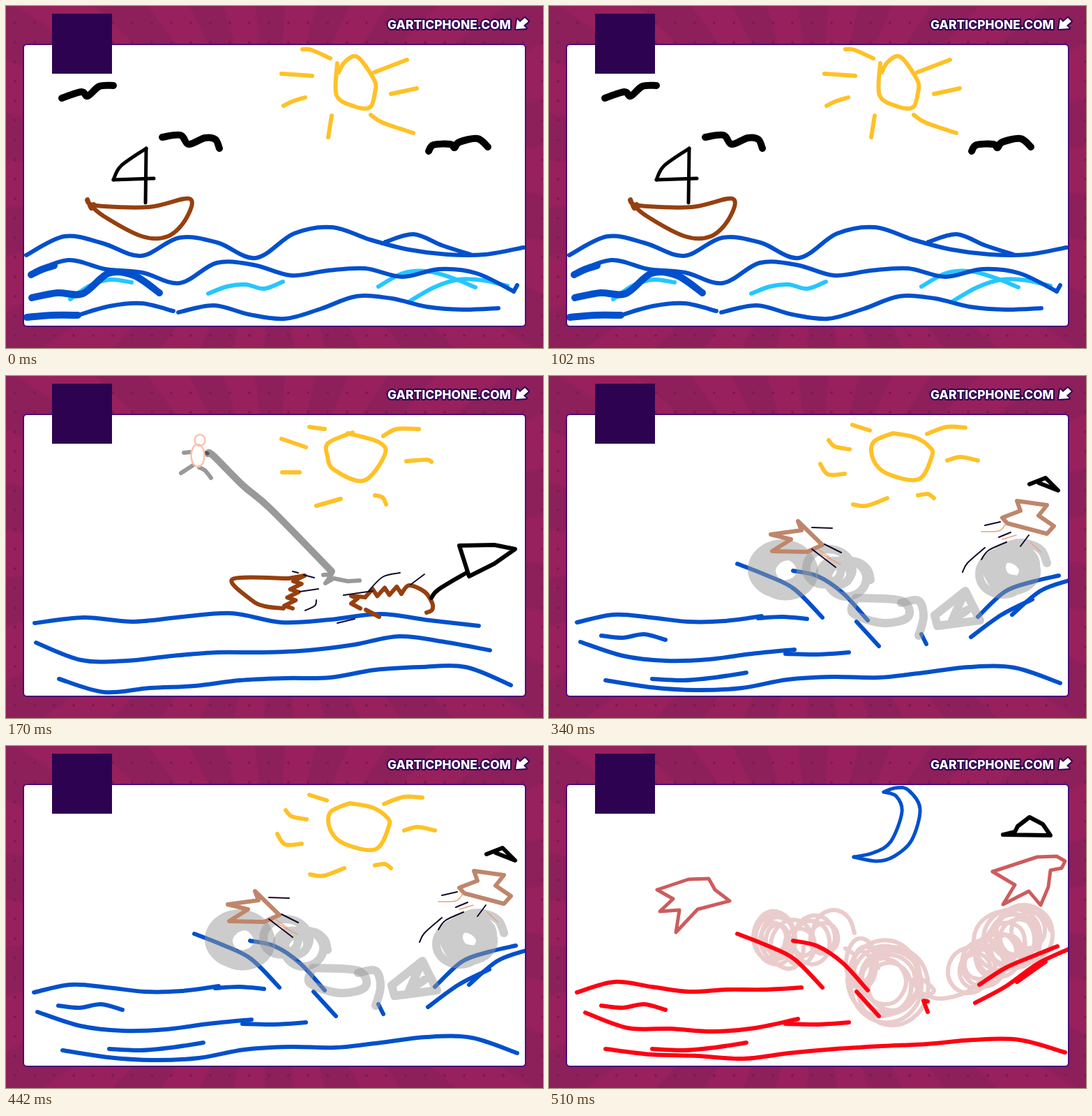
Write an HTML page that moves like this. It is 770 px wide and 490 px high and loops after 0.68 s.

```html
<!DOCTYPE html>
<html lang="en">
<head>
<meta charset="utf-8">
<title>Boat trip</title>
<style>
html, body { margin: 0; width: 100%; height: 100%; overflow: hidden; }
body { background: radial-gradient(circle, #7d1a55 1.8px, transparent 2.4px) -1px 10px / 28px 28px,
  repeating-conic-gradient(from 4deg at 385px 245px, #98215d 0 9deg, #8d1f5b 10deg 19deg, #98215d 20deg); }
svg { display: block; width: 770px; height: 490px; }
text { font: 800 17.4px Inter, "Open Sans", sans-serif; }
.tag { fill: #fff; stroke: #2d0351; stroke-width: 4; stroke-linejoin: round; paint-order: stroke; }
#scenes { fill: none; stroke-linecap: round; stroke-linejoin: round; }
</style>
</head>
<body>
<svg viewBox="0 0 770 490">
  <rect x="25" y="55" width="720" height="404" rx="5" fill="#fff" stroke="#4b0c78" stroke-width="2"/>
  <clipPath id="sheet"><rect x="26" y="56" width="718" height="402" rx="4"/></clipPath>
  <g id="scenes" clip-path="url(#sheet)"></g>
  <rect x="66" y="11" width="86" height="86" fill="#2d0351"/>
  <g class="tag">
    <text x="724" y="33" text-anchor="end">GARTICPHONE.COM</text>
    <path d="M733 19L731 33L746 32L742 28L749 22L744 17L737 23Z"/>
  </g>
</svg>
<script>
const BLUE = "#0050cd", CYAN = "#26c6ff", GOLD = "#ffc126", BROWN = "#96400f", BLACK = "#000",
  RED = "#ff0013", GREY = "#999", INK = "#160a28", TAN = "#bf866b", ROSE = "#cd5c5c", HAZE = "#eacccc";

const pairs = s => s.split(", ").map(p => p.split(" ").map(Number));
const path = (color, width, d, opacity = 1) =>
  `<path stroke="${color}" stroke-width="${width}" stroke-opacity="${opacity}" d="${d}"/>`;

// Smooth curve through all points
function smooth(pts) {
  let d = "M" + pts[0];
  for (let i = 0; i < pts.length - 1; i++) {
    const a = pts[i - 1] || pts[i], b = pts[i], c = pts[i + 1], e = pts[i + 2] || c;
    const h1 = b.map((v, k) => v + (c[k] - a[k]) / 6), h2 = c.map((v, k) => v - (e[k] - b[k]) / 6);
    d += `C${h1} ${h2} ${c}`;
  }
  return d;
}
const curve = (color, width, ...lines) => lines.map(s => path(color, width, smooth(pairs(s)))).join("");
const poly = (color, width, ...lines) => lines.map(s => path(color, width, "M" + pairs(s).join("L"))).join("");

// Curve through evenly spaced heights
const wave = (color, width, x0, x1, ...ys) =>
  path(color, width, smooth(ys.map((y, i) => [x0 + (x1 - x0) * i / (ys.length - 1), y])));

// Splintered edge: every second point is pushed sideways by (dx, dy)
function zigzag(color, x0, y0, x1, y1, n, dx, dy) {
  const pts = Array.from({ length: n + 1 }, (_, i) =>
    [x0 + (x1 - x0) * i / n + i % 2 * dx, y0 + (y1 - y0) * i / n + i % 2 * dy]);
  return path(color, 6, "M" + pts.join("L"));
}

// Scribbled loops drifting from one point to another
function coil(color, width, opacity, x0, y0, x1, y1, rx, ry, turns) {
  const pts = [], n = turns * 10;
  for (let i = 0; i <= n; i++) {
    const t = i / n, a = i * Math.PI / 5, k = .76 + .24 * Math.sin(a * .37);
    pts.push([x0 + (x1 - x0) * t + rx * k * Math.cos(a), y0 + (y1 - y0) * t + ry * k * Math.sin(a)].map(Math.round));
  }
  return path(color, width, smooth(pts), opacity);
}
const smoke = (...c) => coil(GREY, 12, .5, ...c);
const haze = (...c) => coil(HAZE, 6, 1, ...c);

// Strokes of the burst sea that stay in place while the colour turns
const burst = color =>
  wave(color, 6, 270, 392, 269, 285, 305, 346) + wave(color, 6, 350, 457, 279, 287, 311, 350) +
  wave(color, 6, 441, 473, 352, 387) + wave(color, 6, 75, 167, 372, 375, 370, 378) +
  wave(color, 6, 339, 430, 398, 399, 396) + wave(color, 6, 148, 283, 434, 436, 432, 425);

const sailing =
  curve(GOLD, 6,
    "475 82, 474 128, 500 144, 522 145, 529 124, 528 106, 504 73, 486 80, 477 95",
    "425 62, 438 63, 465 75", "395 97, 439 100", "398 143, 410 137, 429 131", "467 157, 462 188",
    "523 156, 540 167, 584 182", "528 95, 575 77", "552 126, 589 118") +
  curve(BLACK, 10,
    "80 132, 108 123, 117 129, 134 115, 154 114",
    "224 188, 250 185, 262 198, 285 189, 300 191, 306 204",
    "606 208, 613 199, 637 198, 643 203, 650 195, 676 190, 691 202") +
  curve(BLACK, 5, "200 282, 201 204", "201 204, 165 229, 154 249", "154 249, 212 247") +
  curve(BROWN, 6,
    "116 278, 130 286, 205 288, 263 276, 258 305, 232 330, 195 330, 140 301, 117 281", "117 277, 122 290, 126 284") +
  wave(CYAN, 6, 92, 180, 420, 400, 392, 396) + wave(CYAN, 6, 290, 397, 412, 402, 399, 405, 395) +
  wave(CYAN, 6, 534, 673, 402, 383, 380, 389, 403) + wave(CYAN, 6, 579, 719, 423, 403, 392, 393, 401) +
  wave(BLUE, 6, 29, 742, 357, 330, 340, 358, 332, 339, 361, 326, 317, 335, 349, 356, 356, 346) +
  wave(BLUE, 6, 544, 666, 338, 327, 343, 356) +
  wave(BLUE, 6, 36, 728, 383, 364, 377, 382, 397, 368, 371, 386, 379, 376, 388, 377, 383, 409) +
  wave(BLUE, 6, 728, 733, 409, 400) +
  wave(BLUE, 6, 103, 240, 443, 430, 426, 437) +
  wave(BLUE, 6, 247, 706, 439, 429, 442, 448, 434, 416, 419, 431, 435, 433) +
  wave(BLUE, 10, 36, 69, 385, 377, 372) + wave(BLUE, 10, 30, 103, 446, 443, 443) +
  wave(BLUE, 10, 37, 220, 418, 411, 412, 383, 386, 411);

const struck =
  curve(GOLD, 6,
    "497 81, 462 96, 461 115, 470 134, 513 150, 543 113, 535 95, 490 82",
    "435 73, 457 76", "395 90, 430 102", "396 138, 421 138", "445 186, 480 176",
    "529 171, 540 174, 545 184", "541 86, 560 76, 592 76", "574 122, 603 120, 610 123") +
  wave(BLUE, 6, 41, 678, 354, 346, 352, 345, 340, 353, 349, 341, 350, 358) +
  wave(BLUE, 6, 43, 694, 382, 407, 408, 401, 396, 396, 393, 385, 373, 381, 393) +
  wave(BLUE, 6, 76, 724, 434, 453, 447, 444, 436, 433, 432, 421, 417, 417, 443) +
  curve(GREY, 6, "255 110, 264 109", "251 139, 268 128", "277 131, 285 135, 294 146") +
  poly(GREY, 6, "455 285, 467 284, 458 297, 470 290, 490 294, 507 293") +
  curve(GREY, 10, "289 111, 297 114, 340 157, 380 191, 467 280") +
  curve("#5b5050", 5, "287 110, 289 111") +
  `<g stroke="#f7c4b0" stroke-width="2.5"><ellipse cx="278" cy="92" rx="7.5" ry="8"/><ellipse cx="275" cy="114" rx="9.5" ry="16"/></g>` +
  curve(BROWN, 6, "405 290, 325 291, 352 321, 372 330, 398 333", "516 335, 535 345") +
  zigzag(BROWN, 428, 286, 411, 333, 8, -14, 2) + zigzag(BROWN, 405, 290, 428, 286, 1, 0, 0) +
  poly(BROWN, 6, "508 333, 495 326, 504 319, 495 315, 515 317") +
  zigzag(BROWN, 515, 317, 567, 312, 6, 2, -11) +
  curve(BROWN, 6, "567 312, 578 300, 600 309, 611 325, 611 335, 603 339") +
  curve(BLACK, 6, "610 318, 620 306, 660 282") +
  poly(BLACK, 6, "650 243, 700 242, 730 248, 700 269, 664 287, 650 243") +
  curve(INK, 2, "411 280, 419 282", "427 285, 442 289", "421 309, 448 305", "445 321, 443 329, 429 336",
    "475 354, 500 348", "484 314, 526 308", "520 308, 540 288, 565 282", "580 299, 600 284");

const blast =
  curve(GOLD, 6,
    "493 82, 465 95, 465 120, 485 140, 530 148, 549 115, 546 102, 525 88, 493 82",
    "435 70, 460 78", "401 92, 410 101, 431 105", "389 126, 400 141, 424 140", "436 184, 455 186, 485 175",
    "529 171, 543 169, 552 175", "542 83, 570 73, 597 74", "571 121, 590 116, 615 121") +
  burst(BLUE) +
  wave(BLUE, 6, 534, 541, 370, 384) + wave(BLUE, 6, 615, 731, 345, 309, 295, 286) +
  wave(BLUE, 6, 605, 693, 374, 342, 320) + wave(BLUE, 6, 664, 745, 342, 308, 293) +
  wave(BLUE, 6, 40, 305, 353, 342, 346, 352, 351, 344) + wave(BLUE, 6, 300, 370, 347, 345, 348) +
  wave(BLUE, 6, 45, 352, 381, 401, 408, 406, 398, 392) +
  wave(BLUE, 6, 81, 733, 436, 446, 450, 447, 435, 431, 432, 425, 417, 418, 440) +
  smoke(333, 278, 345, 278, 44, 38, 5) + smoke(395, 272, 436, 292, 32, 28, 4) +
  [ "440 318, 436 340, 480 354, 515 345, 505 322, 440 318", "505 325, 530 322, 537 345, 530 372" ]
    .map(s => path(GREY, 12, smooth(pairs(s)), .5)).join("") +
  path(GREY, 12, "M597 308L553 343L557 358L618 350ZL578 350L600 335", .5) +
  smoke(652, 285, 676, 268, 38, 32, 6) +
  poly(TAN, 6,
    "357 208, 362 221, 318 227, 347 234, 320 251, 370 252, 392 242, 357 208",
    "671 179, 714 185, 702 200, 724 215, 714 226, 657 211, 650 203, 676 193, 671 179") +
  poly(BLACK, 6, "689 155, 712 146, 730 164, 702 153") +
  curve(INK, 2, "377 217, 406 218", "395 241, 419 253", "377 248, 411 274", "625 214, 647 209", "645 231, 662 224",
    "593 281, 600 268, 625 246", "620 263, 630 250, 656 238", "676 244, 688 228") +
  curve("#e8a27c", 1.5, "386 248, 404 261", "390 255, 418 270", "620 223, 645 222, 655 212",
    "650 234, 670 228", "690 238, 705 252");

const night =
  curve(BLUE, 5,
    "437 159, 465 153, 490 137, 506 95, 498 72, 480 66",
    "480 66, 497 60, 515 63, 532 90, 520 135, 495 158, 470 165, 437 159") +
  poly(BLACK, 6, "651 127, 719 128, 708 112, 689 102, 672 115, 668 123, 652 127") +
  haze(322, 274, 328, 276, 30, 38, 5) + haze(342, 288, 408, 268, 30, 36, 6) +
  haze(447, 312, 452, 318, 22, 38, 3) + haze(480, 335, 492, 344, 54, 58, 7) +
  curve(HAZE, 6, "425 290, 440 300", "530 330, 552 350, 535 360", "530 352, 560 362, 600 352, 625 330") +
  haze(602, 325, 655, 290, 34, 34, 8) + haze(650, 282, 688, 264, 44, 44, 8) +
  poly(ROSE, 5, "155 206, 200 191, 229 190, 238 206, 259 222, 213 234, 182 267, 187 235, 159 237, 178 219, 155 206",
    "636 180, 700 159, 728 158, 740 165, 735 175, 719 178, 716 202, 705 228, 688 208, 651 227, 668 199, 636 180") +
  burst(RED) +
  wave(RED, 6, 617, 729, 342, 318, 302, 287) + wave(RED, 6, 611, 745, 368, 344, 312, 291) +
  wave(RED, 6, 671, 712, 338, 309) + poly(RED, 6, "543 381, 537 365, 543 366") +
  wave(RED, 6, 40, 362, 353, 338, 345, 352, 349, 349, 346) +
  wave(RED, 6, 52, 357, 382, 404, 405, 409, 404, 391) +
  wave(RED, 6, 81, 740, 434, 442, 444, 448, 440, 434, 430, 427, 421, 421, 439);

const stage = document.getElementById("scenes");
stage.innerHTML = [sailing, struck, blast, night].map(s => `<g>${s}</g>`).join("");
const scenes = [...stage.children];
let start;

function show(now) {
  start ??= now;
  const current = Math.floor((now - start) / 170) % scenes.length;
  scenes.forEach((g, i) => g.style.display = i === current ? "" : "none");
  requestAnimationFrame(show);
}
show(performance.now());
</script>
</body>
</html>
```
